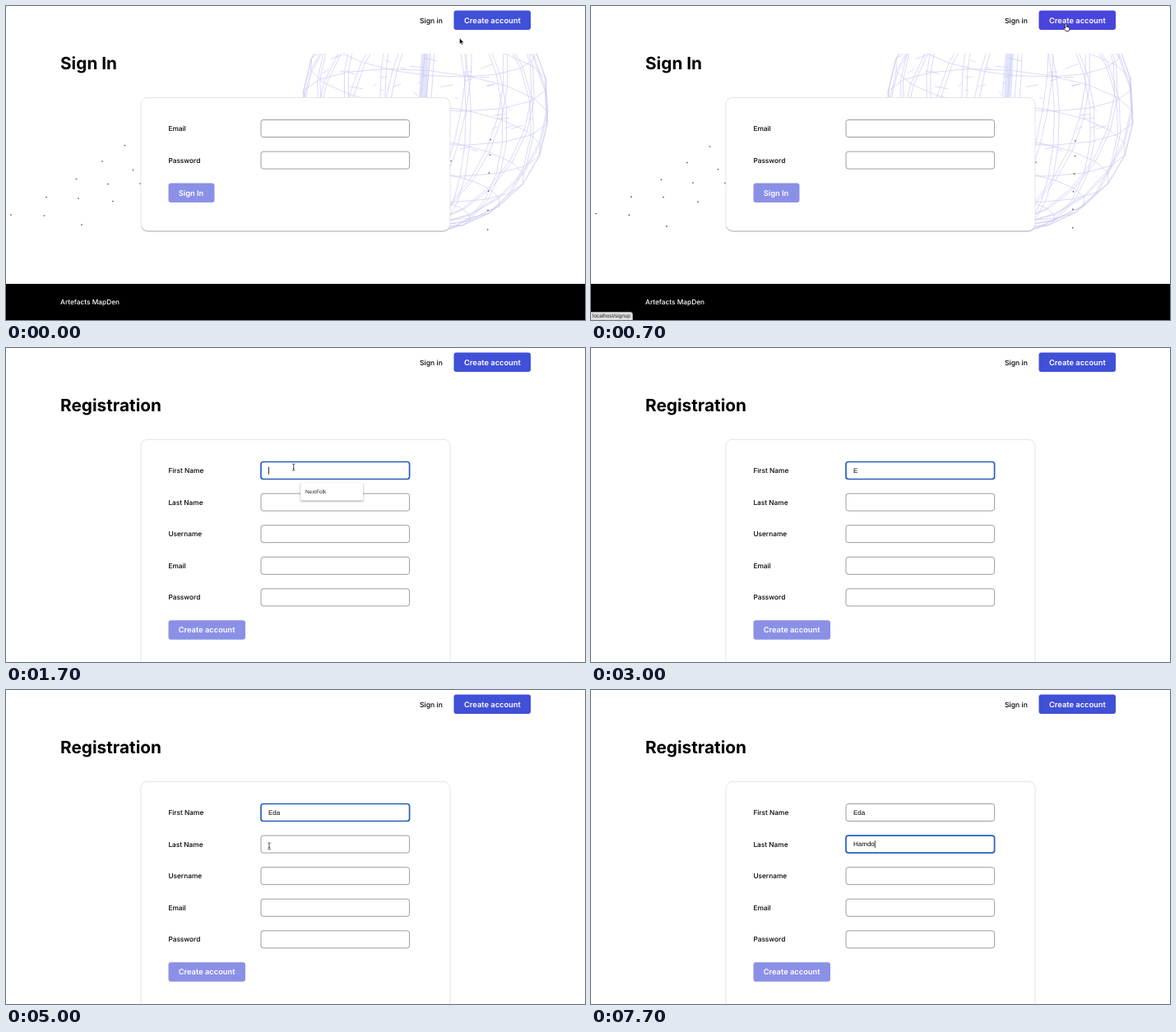
Animation, 704 px wide and 382 px high, one loop 8000 ms. Source, as an HTML page:

```html
<!DOCTYPE html>
<html lang="en">
<head>
<meta charset="utf-8">
<title>Registration form</title>
<style>
  html, body { margin: 0; width: 100%; height: 100%; overflow: hidden; background: #fff; }
  svg { display: block; width: 704px; height: 382px; }
  text { font: 500 8.3px Inter, "Open Sans", sans-serif; text-rendering: geometricPrecision; }
  text.title { font-size: 20.8px; font-weight: 700; }
  text.button { font-size: 9.3px; font-weight: 600; fill: #fff; }
  text.entry { font: 8px "Liberation Sans", Arial, sans-serif; }
  text.small { font: 6.4px "Liberation Sans", Arial, sans-serif; fill: #222; }
  .input { fill: #fff; stroke: #9c9c9c; stroke-width: 1; }
  .input.focus { stroke: #2560bd; stroke-width: 1.7; }
  .wire { fill: none; stroke: #c6c6f1; stroke-width: .65; }
  .card { fill: #fff; stroke: #dedee2; stroke-width: .8; }
  #popup rect { filter: drop-shadow(0 1px 1.2px #0006); }
</style>
</head>
<body>
<svg viewBox="0 0 704 382">
  <defs><clipPath id="crop"><rect x="355" y="58" width="312" height="217"/></clipPath></defs>

  <text x="503" y="21" style="font-size:8.6px">Sign in</text>
  <rect id="navButton" x="544.5" y="5.5" width="93.5" height="23.5" rx="3"/>
  <text class="button" x="557" y="20.6">Create account</text>

  <g id="signIn">
    <g clip-path="url(#crop)">
      <path d="M505 58h9l-3 53h-9z" fill="#c9cdf8" opacity=".55"/>
      <path id="globe" class="wire"/>
      <path id="scratches" class="wire"/>
    </g>
    <g id="dots" fill="#484848"></g>
    <text class="title" x="66" y="77.4">Sign In</text>
    <rect x="164" y="113" width="376" height="161.4" rx="8" fill="#a0a0a4"/>
    <rect class="card" x="164" y="111.4" width="376" height="162" rx="8"/>
    <g id="signInFields"></g>
    <rect x="197.5" y="215.5" width="56" height="23.5" rx="3" fill="#8b90e7"/>
    <text class="button" x="209.7" y="230.6">Sign In</text>
    <rect y="338" width="704" height="44"/>
    <text x="66" y="362.6" fill="#fff">Artefacts MapDen</text>
  </g>

  <g id="signUp">
    <text class="title" x="66" y="77.4">Registration</text>
    <rect class="card" x="164" y="111.4" width="376" height="300" rx="8"/>
    <g id="signUpFields"></g>
    <rect x="197.5" y="331.3" width="93.5" height="23.5" rx="3" fill="#8b90e7"/>
    <text class="button" x="209.7" y="346.4">Create account</text>
    <text id="first" class="entry" x="319" y="151.7"></text>
    <text id="last" class="entry" x="319" y="190.3"></text>
    <rect id="caret" width=".8" height="9"/>
    <g id="popup">
      <rect x="358.3" y="163.5" width="76" height="22" rx="1" fill="#fff"/>
      <text class="small" x="364" y="177.3">NextFolk</text>
    </g>
  </g>

  <g id="status">
    <path d="M-1 372.5H48q2.5 0 2.5 2.5v8H-1z" fill="#dedede" stroke="#b9b9b9" stroke-width=".7"/>
    <text class="small" x="2" y="379.4">localhost/signup</text>
  </g>

  <g id="arrow" class="cursor">
    <path d="M0 0v7.3l1.7-1.5 1.1 2.5 1.2-.5-1.1-2.4h2.3z" stroke="#fff" stroke-width=".5"/>
  </g>
  <g id="hand" class="cursor">
    <path d="M-.9 1a.9.9 0 0 1 1.8 0V3.9l2.5.6q1.1.3.9 1.5l-.7 3h-4L-2.6 6q-.3-1.1.8-.9l.9.8z"
      fill="#fff" stroke="#111" stroke-width=".75"/>
  </g>
  <g id="beam" class="cursor">
    <path d="M-1.7-4q1.4 0 1.7.7.3-.7 1.7-.7M0-3.4v6.8M-1.7 4q1.4 0 1.7-.7.3.7 1.7.7M-.8 1.5h1.6"
      fill="none" stroke="#222" stroke-width=".8"/>
  </g>
</svg>

<script>
const LOOP = 8000, STEP = 100, ROW = 38.6;
const $ = id => document.getElementById(id);
const show = (el, on) => { el.style.display = on ? "" : "none"; };
const within = (t, from, to) => t >= from && t < to;
const latest = (list, t) => list.filter(item => item[0] <= t).pop();

function addFields(group, labels) {
  group.innerHTML = labels.map((label, i) => `
    <text x="197.4" y="${152 + i * ROW}">${label}</text>
    <rect class="input" x="310" y="${138.5 + i * ROW}" width="180.6" height="21" rx="3"/>`).join("");
  return group.querySelectorAll("rect");
}
addFields($("signInFields"), ["Email", "Password"]);
const inputs = addFields($("signUpFields"),
  ["First Name", "Last Name", "Username", "Email", "Password"]);

// x, y, drift in y
const dots = [
  [6, 254, -2], [49, 232.5, -.5], [46.5, 255, -1], [92, 266, 2.5], [85.5, 210.5, 1],
  [88, 234, -2], [117, 189, 2], [124, 216.5, -2], [130, 237.5, 1], [144.5, 169.5, 2],
  [154.5, 199.5, -1], [163, 216, -1], [589, 162.5, 2], [588.5, 181, 2], [587.5, 203, 1.5],
  [586.5, 225, 1], [586, 248.5, -1.5], [585.7, 272, -3], [541, 188.5, 2]
];
$("dots").innerHTML = dots.map(() => `<circle r=".85"/>`).join("");

// Wire sphere, tilted towards the viewer and rolled clockwise
function spherePoint(lat, lon) {
  const tilt = .3, roll = .09, R = 151;
  const x = Math.cos(lat) * Math.sin(lon), y0 = -Math.sin(lat), z = Math.cos(lat) * Math.cos(lon);
  const y = y0 * Math.cos(tilt) + z * Math.sin(tilt);
  const px = x * Math.cos(roll) - y * Math.sin(roll);
  const py = x * Math.sin(roll) + y * Math.cos(roll);
  return (510 + R * px).toFixed(1) + " " + (123 + R * py).toFixed(1);
}
function globePath(spin) {
  const rad = Math.PI / 180, lines = [];
  for (let lon = 0; lon < 360; lon += 20)
    for (const gap of [0, 2.5]) {
      const line = [];
      for (let lat = -80; lat <= 80; lat += 16) line.push(spherePoint(lat * rad, (lon + gap) * rad + spin));
      lines.push("M" + line.join("L"));
    }
  for (let lat = -64; lat <= 64; lat += 16) {
    const line = [];
    for (let lon = 0; lon <= 360; lon += 20) line.push(spherePoint(lat * rad, lon * rad + spin));
    lines.push("M" + line.join("L"));
  }
  return lines.join("");
}

let seed = 11;
const random = () => (seed = seed * 16807 % 2147483647) / 2147483647;
let marks = "";
for (let i = 0; i < 34; i++) {
  const low = i > 24;
  const x = low ? 545 + random() * 70 : 385 + random() * 200;
  const y = low ? 110 + random() * 80 : 62 + random() * 45;
  marks += `M${x} ${y}l${4 + random() * 12} ${random() * 12 - 6}`;
}
$("scratches").setAttribute("d", marks);

const cursorPath = [
  [0, "arrow", 551.5, 39], [100, "hand", 577.5, 21.5],
  [900, "hand", 572, 24], [1000, "arrow", 545, 48], [1100, "arrow", 492, 84],
  [1200, "arrow", 430, 116], [1300, "arrow", 386, 133], [1400, "beam", 363, 141],
  [1500, "beam", 353, 144], [1600, "beam", 349.7, 145], [2400, ""]
];
const firstTyped = [[0, ""], [2400, "E"], [3300, "Ed"], [3500, "Eda"]];
const lastTyped = [[0, ""], [6500, "H"], [6900, "Ha"], [7100, "Ham"], [7200, "Hamd"], [7700, "Hamdo"]];
const caretResets = [[1700], [2400], [3300], [3500], [5300], [6500], [6900], [7100], [7200], [7700]];

function cursorAt(t) {
  if (t < 4000) return latest(cursorPath, t).slice(1);
  if (t >= 6500) return [""];
  const k = Math.min(1, (t - 4000) / 700), ease = k * (2 - k);
  const y = 149 + 41 * ease;
  return [within(y, 160, 177) ? "arrow" : "beam", 348 - 28 * ease, y];
}

function drawBackdrop(t) {
  const phase = t < 100 ? 0 : t < 500 ? .25 : Math.min(1, .5 + (t - 500) / 800);
  $("globe").setAttribute("d", globePath(.04 * phase));
  dots.forEach(([x, y, drift], i) => {
    const dot = $("dots").children[i];
    dot.setAttribute("cx", x);
    dot.setAttribute("cy", y + drift * phase);
  });
}

function render(t) {
  const signingUp = t >= 800, row = t >= 5300 ? 1 : 0;
  show($("signIn"), !signingUp);
  show($("signUp"), signingUp);
  show($("status"), within(t, 500, 1500));
  $("navButton").setAttribute("fill", within(t, 500, 1000) ? "#4944dc" : "#4050d7");
  if (!signingUp) drawBackdrop(t);

  $("first").textContent = latest(firstTyped, t)[1];
  $("last").textContent = latest(lastTyped, t)[1];
  inputs.forEach((el, i) => el.classList.toggle("focus", t >= 1700 && i === row));

  const reset = latest(caretResets, t);
  show($("caret"), reset && (t - reset[0]) % 1000 < 500);
  const entry = row ? $("last") : $("first");
  const width = entry.textContent ? entry.getComputedTextLength() : 0;
  $("caret").setAttribute("x", 319 + width);
  $("caret").setAttribute("y", 144.7 + row * ROW);

  show($("popup"), within(t, 1700, 2500) || within(t, 5400, 6500));
  $("popup").setAttribute("transform", `translate(0 ${row * ROW})`);

  const [kind, x, y] = cursorAt(t);
  document.querySelectorAll(".cursor").forEach(el => {
    show(el, el.id === kind);
    if (el.id === kind) el.setAttribute("transform", `translate(${x} ${y})`);
  });
}

const start = performance.now();
let shown = -1;
function tick() {
  const t = Math.floor((performance.now() - start) % LOOP / STEP) * STEP;
  if (t !== shown) render(shown = t);
  requestAnimationFrame(tick);
}
tick();
</script>
</body>
</html>
```
